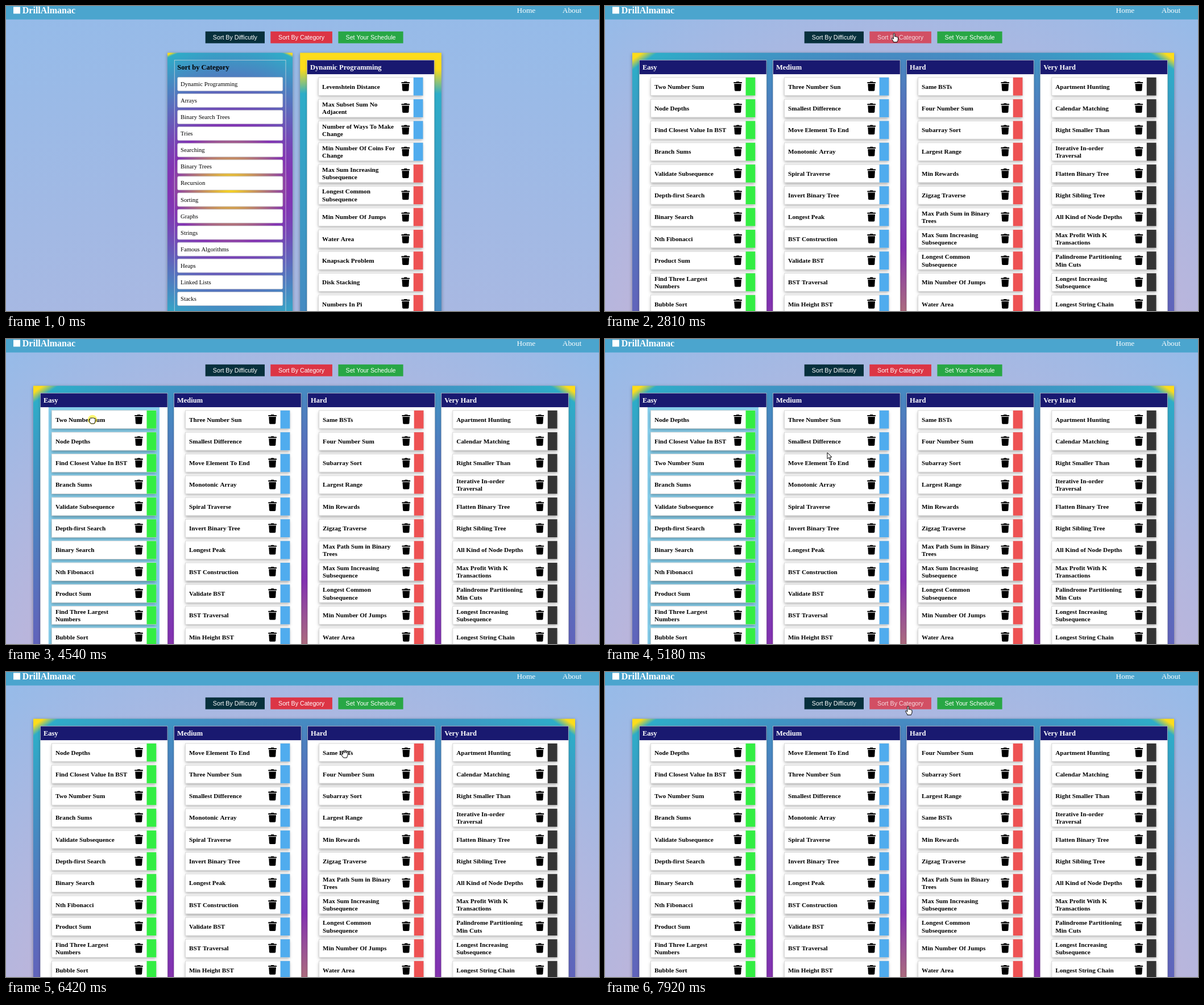
These frames come from a looping animation (1043x537 px, 7.99 s). An HTML page with a canvas:

```html
<!DOCTYPE html>
<html lang="en">
<head>
<meta charset="utf-8">
<title>Sortable problem board</title>
<style>
  html, body { margin: 0; width: 100%; height: 100%; overflow: hidden; }
  canvas { display: block; }
</style>
</head>
<body>
<canvas id="stage" width="1043" height="537"></canvas>
<script>
const W = 1043, H = 537, LOOP = 7990;
const ctx = document.getElementById('stage').getContext('2d');

const SERIF = '"Liberation Serif", "Times New Roman", serif';
const SANS = '"Liberation Sans", Arial, sans-serif';
const GREEN = '#33ee43', BLUE = '#50acee', RED = '#ee5253', DARK = '#343434';
const PITCH = 38.3, CARD_W = 184, CARD_H = 32.3, FIRST_Y = 125.6;

const categories = ['Dynamic Programming', 'Arrays', 'Binary Search Trees', 'Tries',
  'Searching', 'Binary Trees', 'Recursion', 'Sorting', 'Graphs', 'Strings',
  'Famous Algorithms', 'Heaps', 'Linked Lists', 'Stacks'];

const dynamic = {
  title: 'Dynamic Programming', x: 529.6, color: i => i < 4 ? BLUE : RED,
  items: ['Levenshtein Distance', 'Max Subset Sum No|Adjacent', 'Number of Ways To Make|Change',
    'Min Number Of Coins For|Change', 'Max Sum Increasing|Subsequence', 'Longest Common|Subsequence',
    'Min Number Of Jumps', 'Water Area', 'Knapsack Problem', 'Disk Stacking', 'Numbers In Pi']
};

// drag: row moved, its new row, press / release / settled-highlight times
const levels = [
  { title: 'Easy', color: () => GREEN,
    drag: { from: 0, to: 2, press: 4540, release: 4860, end: 5260 },
    items: ['Two Number Sum', 'Node Depths', 'Find Closest Value In BST', 'Branch Sums',
      'Validate Subsequence', 'Depth-first Search', 'Binary Search', 'Nth Fibonacci',
      'Product Sum', 'Find Three Largest|Numbers', 'Bubble Sort'] },
  { title: 'Medium', color: () => BLUE,
    drag: { from: 2, to: 0, press: 5570, release: 5880, end: 6400 },
    items: ['Three Number Sun', 'Smallest Difference', 'Move Element To End', 'Monotonic Array',
      'Spiral Traverse', 'Invert Binary Tree', 'Longest Peak', 'BST Construction',
      'Validate BST', 'BST Traversal', 'Min Height BST'] },
  { title: 'Hard', color: () => RED,
    drag: { from: 0, to: 3, press: 6660, release: 7000, end: 7560 },
    items: ['Same BSTs', 'Four Number Sum', 'Subarray Sort', 'Largest Range', 'Min Rewards',
      'Zigzag Traverse', 'Max Path Sum in Binary|Trees', 'Max Sum Increasing|Subsequence',
      'Longest Common|Subsequence', 'Min Number Of Jumps', 'Water Area'] },
  { title: 'Very Hard', color: () => DARK,
    items: ['Apartment Hunting', 'Calendar Matching', 'Right Smaller Than', 'Iterative In-order|Traversal',
      'Flatten Binary Tree', 'Right Sibling Tree', 'All Kind of Node Depths',
      'Max Profit With K|Transactions', 'Palindrome Partitioning|Min Cuts',
      'Longest Increasing|Subsequence', 'Longest String Chain'] }
];
levels.forEach((col, i) => { col.x = 60.4 + 235.1 * i; });

const buttons = [
  { x: 350.7, w: 104.3, label: 'Sort By Difficutly', color: '#07303c', hover: [[1040, 2230], [3600, 4020]] },
  { x: 465.3, w: 108.6, label: 'Sort By Category', color: '#dc3545', hover: [[2280, 3420], [7400, 9000]] },
  { x: 584.4, w: 114.2, label: 'Set Your Schedule', color: '#28a745', hover: [] }
];

// time, hotspot x, hotspot y, cursor kind from then on
const path = [
  [290, 1010, 545, 'arrow'], [620, 760, 210, 'arrow'], [860, 455, 15, 'arrow'], [1000, 424, 34, 'arrow'],
  [1090, 421, 46, 'hand'], [1320, 418, 52, 'hand'], [2100, 418, 52, 'hand'], [2560, 508.5, 48, 'hand'],
  [3240, 508.5, 48, 'hand'], [3680, 428, 61, 'hand'], [3960, 428, 61, 'hand'], [4030, 400, 75, 'arrow'],
  [4380, 152, 142, 'grab'], [4540, 152, 142, 'fist'], [4860, 156, 219, 'arrow'], [5180, 391, 200, 'arrow'],
  [5330, 399, 214, 'arrow'], [5400, 399, 214, 'grab'], [5570, 399, 214, 'fist'], [5880, 402, 139, 'arrow'],
  [6350, 596, 144, 'grab'], [6660, 596, 144, 'fist'], [7000, 608, 258, 'arrow'], [7060, 606, 254, 'arrow'],
  [7390, 543, 64, 'hand'], [7680, 533, 60, 'hand']
];
const presses = [[1320, 1460], [2720, 2810], [3830, 3900],
  ...levels.filter(c => c.drag).map(c => [c.drag.press, c.drag.release]), [7840, 7920]];

const shapes = {
  arrow: new Path2D('M0 0V11L2.6 8.6 4.4 12.8 6.2 12 4.4 8H8Z'),
  hand: new Path2D('M-1.2.8Q0-.8 1.2.8V6Q2.3 5 3.4 6.2 4.6 5.6 5.4 6.8 6.8 6.4 7 8V11Q7 13 5.5 14.4V15.6H-1.3V14.4L-4.4 9.6Q-4.6 7.6-2.8 8.6L-1.2 10Z'),
  grab: new Path2D('M-3.6 1L-4.2-4Q-3.6-5.8-2.4-4.6L-1.6-1.5V-5.6Q-.6-7.4.4-5.6V-1.8L1.2-5.4Q2.6-6.6 3-4.8L2.8-1.2 3.8-3.4Q5.2-4.2 5.6-2.6L4.6 3.5 3.4 7H-2.4L-6 2Q-6.2.2-4.8.6Z'),
  fist: new Path2D('M-4.5 1V-2Q-3.2-4-2-2.4-.8-4 .4-2.6 1.8-4 2.8-2.2 4.6-3 5-1V3L3.4 7H-2.6L-5.6 3Q-6 1-4.5 1Z')
};
const trash = new Path2D('M432 32H312l-9-19a24 24 0 0 0-22-13H167a24 24 0 0 0-22 13L136 32H16A16 16 0 0 0 0 48v32a16 16 0 0 0 16 16h416a16 16 0 0 0 16-16V48a16 16 0 0 0-16-16zM53 467a48 48 0 0 0 48 45h246a48 48 0 0 0 48-45L416 128H32z');

const clamp = v => Math.max(0, Math.min(1, v));
const ease = v => { v = clamp(v); return v * v * (3 - 2 * v); };
const mix = (a, b, p) => a + (b - a) * p;

function rect(x, y, w, h, fill) {
  ctx.fillStyle = fill;
  ctx.fillRect(x, y, w, h);
}

function text(str, x, y, font, fill, align = 'left') {
  ctx.font = font;
  ctx.fillStyle = fill;
  ctx.textAlign = align;
  ctx.fillText(str, x, y);
}

function shadow(color, blur, dy) {
  ctx.shadowColor = color;
  ctx.shadowBlur = blur;
  ctx.shadowOffsetY = dy;
}

function radial(cx, cy, r, stops) {
  const g = ctx.createRadialGradient(cx, cy, 0, cx, cy, r);
  stops.forEach(([at, color]) => g.addColorStop(at, color));
  return g;
}

function backdrop(cy) {
  rect(0, 0, W, H, radial(W / 2, cy, Math.hypot(W / 2, cy), [[0, '#eeaeca'], [1, '#94bbe9']]));
}

function panel(x, w, h) {
  const y = 82.4;
  const fill = radial(x + w / 2, y + h / 2, Math.hypot(w, h) / 2,
    [[0, '#fddc1b'], [0.4, '#8332b2'], [0.97, '#2eadc8'], [0.988, '#fddc1b'], [1, '#fddc1b']]);
  ctx.save();
  shadow('rgba(0,0,0,.35)', 6, 2);
  rect(x, y, w, h, fill);
  ctx.restore();
}

function card(x, y, title, color) {
  ctx.save();
  shadow('rgba(0,0,0,.32)', 5, 2.5);
  rect(x, y, CARD_W, CARD_H, '#fff');
  ctx.restore();
  ctx.strokeStyle = '#d0d0d0';
  ctx.lineWidth = 0.8;
  ctx.strokeRect(x + 0.3, y + 0.3, CARD_W - 0.6, CARD_H - 0.6);
  rect(x + CARD_W - 16.7, y + 0.3, 16.7, CARD_H - 0.6, color);

  const lines = title.split('|');
  const base = y + 19.9 - (lines.length - 1) * 6.6;
  lines.forEach((s, i) => text(s, x + 6.7, base + i * 13.2, `bold 11.2px ${SERIF}`, '#000'));

  ctx.save();
  ctx.translate(x + 146, y + 7.3);
  ctx.scale(0.0328, 0.0328);
  ctx.fillStyle = '#000';
  ctx.fill(trash);
  ctx.restore();
}

// Offset of a card from its starting slot
function offset(drag, i, t) {
  if (!drag || t < drag.press) return [0, 0];
  const { from, to, press, release } = drag;
  const span = to - from, dir = Math.sign(span);
  if (i === from) {
    const [x0, y0] = cursorAt(press), [x1, y1] = cursorAt(Math.min(t, release));
    const p = ease((t - release) / 280);
    return [mix(x1 - x0, 0, p), mix(y1 - y0, span * PITCH, p)];
  }
  const k = (i - from) * dir;
  if (k < 0 || k > Math.abs(span)) return [0, 0];
  const start = press + (release - press) * (k - 0.5) / Math.abs(span);
  return [0, -dir * PITCH * ease((t - start) / 200)];
}

function column(col, t) {
  const { x, title, items, color, drag } = col;
  ctx.save();
  shadow('rgba(0,0,0,.3)', 4, 2);
  rect(x, 95.3, 223.6, H, '#fff');
  ctx.restore();
  if (drag && t >= drag.press && t < drag.end) rect(x + 14.4, 120, 195.2, H, '#87ceeb');
  rect(x, 95.3, 223.6, 24.8, '#191970');
  ctx.strokeStyle = 'rgba(211,211,211,.75)';
  ctx.lineWidth = 0.8;
  ctx.strokeRect(x, 95.2, 223.6, H);
  text(title, x + 5.5, 111.8, `bold 12.48px ${SERIF}`, '#fff');

  const place = i => {
    const [dx, dy] = offset(drag, i, t);
    card(x + 19.8 + dx, FIRST_Y + i * PITCH + dy, items[i], color(i));
  };
  items.forEach((_, i) => { if (!drag || i !== drag.from) place(i); });
  if (drag) place(drag.from);
}

function categoryView(t) {
  backdrop(2500);
  panel(284, 220, 472);
  ctx.strokeStyle = 'rgba(220,220,225,.8)';
  ctx.lineWidth = 0.9;
  ctx.strokeRect(296.3, 95.3, 195.7, 446);
  text('Sort by Category', 301.3, 111.8, `bold 12.48px ${SERIF}`, '#000');
  categories.forEach((name, i) => {
    const y = 125.4 + i * 29.08;
    ctx.beginPath();
    ctx.roundRect(301.7, y, 185, 24, 2);
    ctx.fillStyle = '#fff';
    ctx.fill();
    ctx.strokeStyle = '#c4c4cc';
    ctx.lineWidth = 0.7;
    ctx.stroke();
    text(name, 307, y + 15.6, `10.67px ${SERIF}`, '#000');
  });
  panel(517.2, 248.6, 4800);
  column(dynamic, t);
}

function levelView(t) {
  backdrop(755);
  panel(48, 953, 1346);
  levels.forEach(col => column(col, t));
}

function chrome(t) {
  rect(0, 0, W, 23.7, '#4ba5ce');
  rect(13, 1.5, 12, 12, '#fff');
  text('DrillAlmanac', 28.8, 12.8, `bold 16px ${SERIF}`, '#fff');
  text('Home', 898.6, 12, `13.33px ${SERIF}`, '#fff');
  text('About', 978.8, 12, `13.33px ${SERIF}`, '#fff');

  buttons.forEach(b => {
    const glow = Math.max(0, ...b.hover.map(([on, off]) =>
      Math.min(ease((t - on) / 150), 1 - ease((t - off) / 150))));
    ctx.globalAlpha = 1 - 0.2 * glow;
    rect(b.x, 44.8, b.w, 20.8, b.color);
    text(b.label, b.x + b.w / 2, 58.8, `10.67px ${SANS}`, '#fff', 'center');
    ctx.globalAlpha = 1;
  });
}

function cursorAt(t) {
  const i = path.findLastIndex(k => k[0] <= t);
  if (i < 0) return path[0].slice(1);
  const a = path[i], b = path[i + 1] || a;
  const p = b === a ? 0 : ease((t - a[0]) / (b[0] - a[0]));
  return [mix(a[1], b[1], p), mix(a[2], b[2], p), a[3]];
}

function cursor(t) {
  const [x, y, kind] = cursorAt(t);
  ctx.save();
  ctx.translate(x, y);
  if (presses.some(([on, off]) => t >= on && t < off)) {
    ctx.beginPath();
    ctx.arc(0, 0, 8.2, 0, 7);
    ctx.fillStyle = 'rgba(255,240,0,.55)';
    ctx.fill();
  }
  ctx.fillStyle = '#fff';
  ctx.strokeStyle = '#000';
  ctx.lineWidth = 1;
  ctx.lineJoin = 'round';
  ctx.fill(shapes[kind]);
  ctx.stroke(shapes[kind]);
  ctx.restore();
}

function draw(now) {
  const t = now % LOOP;
  const byLevel = (t >= 1530 && t < 2880) || t >= 3900;
  (byLevel ? levelView : categoryView)(t);
  chrome(t);
  cursor(t);
}

const began = performance.now();
function tick() {
  draw(performance.now() - began);
  requestAnimationFrame(tick);
}
tick();
</script>
</body>
</html>
```
